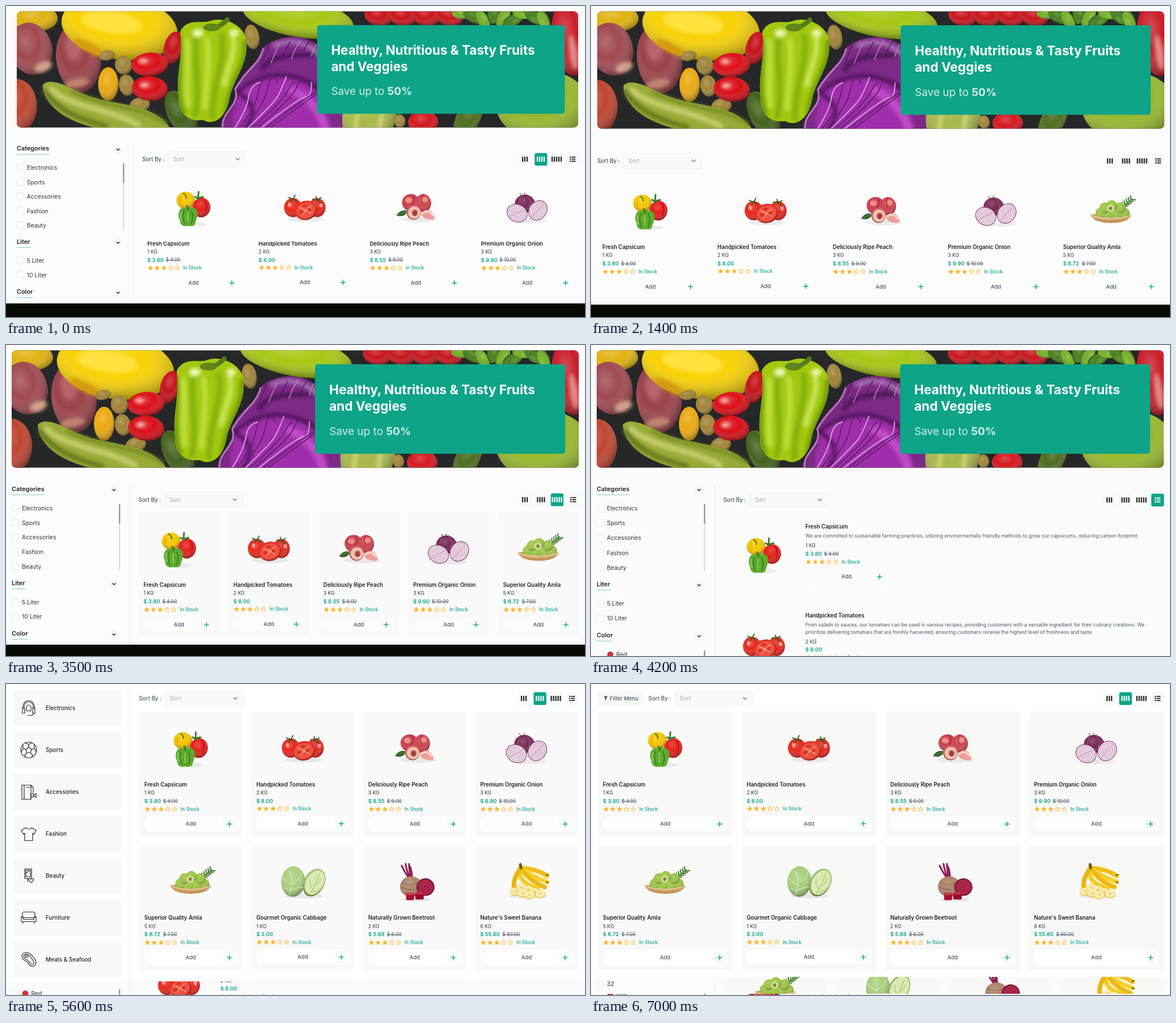
These frames come from a looping animation (1021x549 px, 7700 ms). An HTML page:

```html
<!DOCTYPE html>
<html lang="en">
<head>
<meta charset="utf-8">
<title>Shop layouts</title>
<style>
html, body { margin: 0; width: 100%; height: 100%; overflow: hidden; background: #fcfcfc; }
#stage { display: block; width: 1021px; height: 549px; font-family: Inter, "Open Sans", sans-serif; }
</style>
</head>
<body>
<svg id="stage" viewBox="0 0 1021 549" xmlns="http://www.w3.org/2000/svg"></svg>
<script>
const W = 1021, H = 549, STEP = 700;
const GREEN = '#0da487', INK = '#222', SOFT = '#4a5568';

const range = n => [...Array(n).keys()];
const text = (x, y, s, size, fill = INK, weight = 400, extra = '') =>
  `<text x="${x}" y="${y + size * 0.36}" font-size="${size}" font-weight="${weight}" fill="${fill}" ${extra}>${s.replace(/&/g, '&amp;')}</text>`;
const rect = (x, y, w, h, fill, rx = 0, extra = '') =>
  `<rect x="${x}" y="${y}" width="${w}" height="${h}" rx="${rx}" fill="${fill}" ${extra}/>`;
const oval = (x, y, rx, ry, fill, rot = 0) =>
  `<ellipse cx="${x}" cy="${y}" rx="${rx}" ry="${ry}" fill="${fill}" transform="rotate(${rot} ${x} ${y})"/>`;
const ball = (x, y, rx, ry, fill, rot = 0) => oval(x, y, rx, ry, fill, rot) + oval(x, y, rx, ry, 'url(#shade)', rot);
const shape = (d, fill) => `<path d="${d}" fill="${fill}"/>`;
const line = (d, stroke, w = 1) =>
  `<path d="${d}" fill="none" stroke="${stroke}" stroke-width="${w}" stroke-linecap="round" stroke-linejoin="round"/>`;
const soft = body => `<g filter="url(#blur)">${body}</g>`;
const move = (x, y, body, s = 1) => `<g transform="translate(${x} ${y}) scale(${s})">${body}</g>`;
const chevron = (x, y, c = INK, r = 2.4) => line(`M${x - r} ${y - r / 2}l${r} ${r}l${r} ${-r}`, c, 1.4);

// Cut onion: rings from the skin inwards
const onionHalf = (x, y, rx, ry, rot) => oval(x, y, rx, ry, '#8d4574', rot) + oval(x, y, rx - 1.3, ry - 1.3, '#f0e2ec', rot) +
  range(4).map(i => `<ellipse cx="${x}" cy="${y}" rx="${rx - 4 - i * 3.3}" ry="${ry - 4 - i * 3.3}" fill="none" stroke="#c594b7" stroke-width="1" transform="rotate(${rot} ${x} ${y})"/>`).join('');

// Produce, drawn around its own centre
const art = [
  oval(2, 29, 20, 4, '#0001') +
    ball(-14, -14, 16.5, 15, '#f7c600') + line('M-18 -26q5 2 5 8', '#5b8b2b', 2.5) + line('M-22 -20q-5 8 1 16', '#d89c05', 1.2) +
    ball(14, -1, 16, 17.5, '#e5201c', 12) + line('M20 -14q7 10 1 22', '#b10f14', 1.5) +
    line('M8 -16l1 -13M8 -17l-5 -3M9 -18l8 -2', '#3c7a2b', 3) +
    shape('M-25 5C-23 -3 -14 1 -10 -1C-4 -3 5 -1 7 6C8 16 4 23 2 30C-4 34 -9 31 -12 32C-19 34 -25 28 -24 22C-28 15 -27 9 -25 5Z', '#5cab2e') +
    line('M-17 5q-4 10 1 23M-4 5q5 10 0 23', '#367b1e', 1.6) + line('M-22 8q-2 8 1 14M-10 8q-1 8 0 16', '#94d05c', 2) +
    line('M-10 3q1 -4 -2 -7', '#3b7d22', 3),
  oval(2, 20, 32, 5, '#0001') +
    ball(-21, -1, 16, 17, '#e8281d') + ball(22, -1, 15, 17, '#e8281d') + oval(-27, -6, 3, 4, '#ff9b8d') + oval(29, -5, 3, 4, '#ff9b8d') +
    ball(2, 4, 20, 17, '#e02a20', -15) + oval(2, 4, 17, 14, '#ee5240', -15) +
    line('M2 4l-11 -5M2 4l-7 8M2 4l9 -8M2 4l9 5', '#f9a48b', 1.5) +
    oval(-6, 7, 4, 3, '#d5321f') + oval(8, 3, 3, 3, '#d5321f') + oval(0, -4, 4, 2, '#d5321f') +
    line('M-21 -16l-8 -3M-21 -16l-4 5M-21 -16l7 4M-21 -16l4 -7M22 -14l-8 -2M22 -14l7 5M22 -14l7 -5M22 -14l-2 -7', '#2f642a', 1.8),
  oval(6, 20, 32, 5, '#0001') +
    ball(-9, -10, 16, 15, '#c93d4e') + ball(13, -9, 14, 16, '#cd4450') + oval(-13, -14, 6, 5, '#e88f83') + oval(16, -15, 5, 5, '#e88f83') +
    line('M-5 -24q4 9 -2 18M12 -24q-4 8 0 16', '#a02638', 1.3) +
    shape('M-35 13Q-27 1 -15 5Q-20 18 -35 13Z', '#33622b') + line('M-33 12L-17 6', '#74a557', 0.8) +
    ball(-4, 7, 13, 13.5, '#d0535c') + oval(-3, 8, 11, 11, '#f5c3ae') + oval(-2, 8, 6, 6, '#d8807a') + oval(-2, 9, 4, 5, '#984045') +
    shape('M10 8Q24 -4 32 13Q37 23 22 20Q9 18 10 8Z', '#ee9e99') + line('M12 9Q22 2 30 13', '#fad8c7', 3),
  oval(2, 23, 32, 4, '#0001') +
    line('M-8 -20l-5 -6M-7 -20l3 -7M-6 -20l6 -4', '#9d6a54', 1.6) + ball(-4, -8, 18, 16, '#762852') +
    line('M-12 -19q-7 10 -1 19M0 -22q8 9 4 20', '#ad6692', 1) +
    onionHalf(-18, 9, 19, 16, 25) + onionHalf(19, 4, 16, 19, 38) +
    line('M-31 15L-7 3M8 16L29 -7', '#b77ca0', 0.8),
  line('M8 -1Q24 -10 37 -22', '#427a31', 1.5) +
    range(6).map(i => line(`M${17 + i * 3.6} ${-6 - i * 2.8}l-1 -7M${17 + i * 3.6} ${-6 - i * 2.8}l8 0`, '#4b8238', 2.2)).join('') +
    shape('M-37 6Q0 1 36 6Q31 20 0 21Q-30 20 -37 6Z', '#c99a5f') +
    [[-18, 3], [-5, 6], [10, 6], [23, 3], [-11, -6], [16, -6], [1, -10]].map(([x, y]) => ball(x, y, 9.5, 9.5, '#9cc445')).join('') +
    oval(-1, -5, 7, 6.5, '#c9dd88') + oval(-1, -5, 2.5, 3, '#8b7441') +
    shape('M-37 6Q0 18 36 6Q31 20 0 21Q-30 20 -37 6Z', '#cfa267') +
    line('M-36 7Q0 19 35 7', '#e8cc98', 2) + line('M-29 15Q0 22 28 15', '#a97840', 1),
  oval(2, 25, 34, 4, '#0001') + ball(-17, -1, 21, 27, '#a8cf7c', 4) +
    line('M-24 23Q-15 0 -24 -20M-19 5Q-31 0 -35 -8M-19 4Q-6 -4 -3 -15M-21 14Q-8 9 1 9M-21 15L-33 11', '#d9ebbd', 1.1) +
    ball(20, 1, 18, 26, '#93c063', 28) + oval(21, 1, 15.5, 23, '#dce9b2', 28) +
    line('M12 22Q24 4 29 -14M18 13Q11 5 13 -5M20 7Q29 3 32 -6M16 18Q28 17 33 10', '#aecb7b', 1.4),
  oval(4, 31, 26, 4, '#0001') +
    line('M-8 -4Q-18 -18 -23 -29M-7 -4Q-14 -18 -16 -32M-6 -4Q-10 -20 -10 -32M-5 -4Q-4 -16 -8 -27', '#8d1c52', 3) +
    ball(-6, 8, 20, 18, '#ac8469') + line('M-22 1q14 6 33 0M-24 9q16 8 34 3', '#7f5548', 0.8) +
    oval(19, 9, 16, 15.5, '#6d1d32') + oval(19, 9, 14.5, 14, '#a31c42') +
    range(3).map(i => `<circle cx="19" cy="9" r="${11 - i * 3.6}" fill="none" stroke="#c7446a" stroke-width="0.9"/>`).join('') +
    move(-15, 19, rect(0, 0, 14, 13, '#a90f31', 2) + rect(1, 0, 12, 4, '#d93a58', 1)) +
    move(1, 18, rect(0, 0, 15, 13, '#9c0b2c', 2) + rect(1, 0, 13, 4, '#cf2f50', 1)),
  oval(4, 25, 34, 4, '#0001') +
    [['M-10 -25Q18 -23 36 -11', '#f2c21a'], ['M-10 -25Q8 -10 36 0', '#f8d432'], ['M-10 -25Q4 -2 32 9', '#eebb15'], ['M-12 -24Q-16 2 20 11', '#f6cf2b'], ['M-12 -22Q-25 -5 -22 12', '#e9b813']]
      .map(([d, c]) => line(d, c, 8) + line(d, '#c7931655', 1)).join('') +
    line('M-10 -25l-1 -6', '#6b5a22', 5) + line('M35 -12l3 -1M35 0l3 1', '#5a4a1c', 2) +
    [[-20, 17], [-9, 10], [3, 14], [14, 18], [-7, 20], [5, 23], [24, 21]]
      .map(([x, y]) => oval(x, y, 9.5, 7.5, '#e6c54d') + oval(x, y - 0.7, 8.5, 6.6, '#faedb0') + oval(x, y - 0.7, 2.5, 2, '#e6cf7a')).join('')
];

const goods = [
  ['Fresh Capsicum', 1, '3.80', '4.00'],
  ['Handpicked Tomatoes', 2, '8.00'],
  ['Deliciously Ripe Peach', 3, '8.55', '9.00'],
  ['Premium Organic Onion', 3, '9.90', '10.00'],
  ['Superior Quality Amla', 5, '6.72', '7.00'],
  ['Gourmet Organic Cabbage', 1, '3.00'],
  ['Naturally Grown Beetroot', 2, '5.88', '6.00'],
  ["Nature's Sweet Banana", 6, '55.80', '60.00']
];

const starPath = 'M' + range(10).map(i => {
  const r = i % 2 ? 2.2 : 5.2, a = i * Math.PI / 5;
  return `${(r * Math.sin(a)).toFixed(2)} ${(-r * Math.cos(a)).toFixed(2)}`;
}).join('L') + 'Z';

function rating(x, y) {
  return range(5).map(i => move(x + 5.5 + i * 12, y, i < 3 ? shape(starPath, '#ffb321')
    : line(starPath, '#ffb321', 0.9), i < 3 ? 1 : 0.9)).join('') + text(x + 64, y - 0.3, 'In Stock', 8.5, GREEN, 500);
}

function addButton(x, y, w, fill, spot) {
  const px = x + w - 14;
  return rect(x, y - 13.3, w, 26.6, fill, 13.3) + oval(px, y, 11.8, 11.8, spot) +
    text(x + w / 2, y, 'Add', 9.5, SOFT, 500, 'text-anchor="middle"') +
    line(`M${px - 4} ${y + 0.3}h8M${px} ${y - 3.7}v8`, GREEN, 1.4);
}

function details(item, x, y, w, skin) {
  const [, kg, price, old] = item, lift = old ? 0 : 0.8;
  return text(x, y, kg + ' KG', 8.7, '#333') + text(x, y + 14.5, '$ ' + price, 9.4, GREEN, 600) +
    (old ? text(x + (price.length > 4 ? 39 : 33), y + 14.5, '$ ' + old, 8.5, SOFT, 400, 'text-decoration="line-through"') : '') +
    rating(x, y + 29 - lift) + addButton(x, y + 55 - lift, w, skin.pill, skin.card);
}

function card(i, x, y, w, skin) {
  return rect(x, y, w, goods[i][3] ? 219.5 : 218.7, skin.card, 3) +
    `<use href="#item${i}" x="${x + w / 2}" y="${y + 65}"/>` +
    text(x + 9, y + 128.3, goods[i][0], 9.65, INK, 600) + details(goods[i], x + 9, y + 143, w - 18, skin);
}

function grid(x, right, cols, y, rows, skin) {
  const gap = 15.5, w = (right - x - gap * (cols - 1)) / cols;
  return range(cols * rows).map(i =>
    card(i % 8, x + i % cols * (w + gap), y + Math.floor(i / cols) * 235.6, w, skin)).join('');
}

function sortBar(x, y, active, right) {
  const bars = n => range(n).map(i => (i - (n - 1) / 2) * 4);
  const icons = [3, 4, 5, 0].map((n, i) => {
    const on = i === active, c = on ? '#fff' : INK;
    const mark = n ? bars(n).map(dx => rect(dx - 1.1, -4.5, 2.2, 9, c)).join('')
      : range(3).map(k => rect(-5, k * 3.6 - 4.6, 2.2, 2.2, c) + rect(-1.6, k * 3.6 - 4.5, 6.8, 1.8, c)).join('');
    return move(right - [96, 67.6, 39.4, 11][i], y, rect(-11, -11, 22.5, 22.5, on ? GREEN : '#f8f8f7', 3) + mark);
  }).join('');
  return text(x, y, 'Sort By :', 9.8, SOFT, 500) +
    rect(x + 46, y - 13.5, 138, 27, '#f9f9f9', 4, 'stroke="#f0f0ee"') +
    text(x + 55, y, 'Sort', 9.9, '#a5a9ae') + chevron(x + 170, y, '#777', 3) + icons;
}

function heading(x, y, s, w) {
  return text(x, y, s, 10.95, INK, 600) + rect(x, y + 10, w, 1, '#7fcfbe') +
    oval(x + 180.5, y + 2, 7.5, 7.5, '#f7f7f5') + chevron(x + 180.5, y + 2);
}
const option = (x, y, s, dot) => rect(x + 0.5, y - 6, 12, 12, '#fff', 1, 'stroke="#e6e6e2"') +
  (dot ? oval(x + 24, y, 5.4, 5.4, dot) : '') + text(x + (dot ? 34.5 : 18), y, s, 10.4, '#333');
const scroller = (x, y, thumb, track) => rect(x, y, 2.4, track, '#dededc', 1) + rect(x, y, 2.4, thumb, '#999', 1);

function sidebar(x, y, k = 1) {
  const list = (items, top) => items.map((s, i) => option(x, y + (top + i * 26.1) * k, ...[].concat(s))).join('');
  return heading(x, y, 'Categories', 58) + list(['Electronics', 'Sports', 'Accessories', 'Fashion', 'Beauty'], 34.5) +
    scroller(x + 189, y + 26.5, 35, 119 * k) +
    heading(x, y + 168 * k, 'Liter', 25) + list(['5 Liter', '10 Liter'], 202.3) +
    heading(x, y + 258.2 * k, 'Color', 28) +
    list([['Red', '#d0323a'], ['Black', '#0b0b0b'], ['Purple', '#9b8094'], ['White', '#d6d6d6'], ['Green', GREEN]], 292.3) +
    scroller(x + 189, y + 285 * k, 72, 119) +
    heading(x, y + 426, 'Waist', 30) + list(['28', '30', '32'], 460.5);
}
const divider = (x, y) => rect(x, y, 1, H - y, '#e8e8e6');

const pepper = 'M302 46C314 20 340 32 354 27C378 17 417 33 420 62C424 104 397 130 390 164C385 196 364 215 342 203C316 207 297 190 299 160C294 122 308 91 302 46Z';
const cabbage = 'M374 220C372 188 408 176 398 148C420 106 440 106 448 75C472 55 512 45 548 70L610 130V220Z';

const produce =
  rect(0, 0, W, 230, '#262729') + ball(42, 22, 42, 24, '#e0b210') +
  ball(36, 76, 38, 47, '#a04850', -15) + ball(121, 92, 40, 62, '#9c424a', -5) +
  soft(oval(58, 108, 16, 9, '#d0a08a', -20) + oval(118, 137, 22, 8, '#c08470', -10) + oval(112, 70, 12, 26, '#b9646a')) +
  ball(10, 178, 37, 48, '#bf4530') +
  ball(194, 38, 104, 57, '#f8d204', 8) + soft(oval(180, 30, 55, 18, '#ffe23c', 8) + oval(140, 74, 30, 8, '#d79a08', 28)) +
  [[172, 88, 14, 9], [201, 105, 15, 17], [207, 141, 14, 19], [230, 176, 18, 13], [430, 55, 13, 22], [693, 205, 10, 12]]
    .map(a => ball(...a, '#a08438', -10)).join('') +
  ball(174, 139, 18, 30, '#eaa911') + ball(290, 74, 17, 29, '#c5141b', 15) +
  ball(248, 104, 33, 21, '#dc0f17', -5) + ball(248, 147, 32, 22, '#d80e16', 5) +
  soft(oval(236, 98, 8, 4, '#ffc9c0') + oval(238, 141, 8, 4, '#ffc9c0')) +
  ball(304, 192, 24, 45, '#44611d', -28) +
  shape('M57 141C68 127 96 140 121 153C184 183 250 166 286 220H165C96 207 60 177 57 141Z', '#98ab37') +
  soft(line('M72 148C105 180 175 183 228 212', '#c6cd6e', 10) + line('M62 152C84 188 130 204 170 214', '#66781f', 9) +
    line('M110 152C170 182 230 176 276 208', '#748822', 6)) +
  shape(pepper, '#a3c80f') +
  `<g clip-path="url(#pepper)">` +
    soft(line('M300 60C304 100 290 140 306 190', '#6f9c08', 12) + line('M420 66C424 108 394 130 386 190', '#6f9c08', 14) +
      line('M330 60C326 110 340 150 328 196M376 52C384 100 356 150 360 200', '#85ae0a', 9) +
      line('M314 62C318 100 312 140 316 176M350 60C356 110 346 150 346 180', '#bfdf3c', 10) +
      line('M396 56C402 86 386 110 380 140', '#cbe65c', 9) + oval(334, 48, 10, 7, '#f0f8b8') + oval(398, 48, 9, 7, '#e9f5a4')) + '</g>' +
  line('M358 38Q374 38 386 24', '#56791c', 8) + oval(358, 38, 15, 7, '#5f851b') +
  ball(512, 20, 100, 35, '#a6c812', 10) +
  shape(cabbage, '#7c2a86') +
  `<g clip-path="url(#cabbage)">` +
    soft(shape('M398 150C440 118 478 117 510 130C545 146 566 178 570 220H398C390 190 412 170 398 150Z', '#a02fac') +
      line('M400 156C440 122 490 110 548 146M448 112C470 78 520 92 556 84M420 216C440 190 430 170 410 158', '#4a1556', 8) +
      line('M470 70C500 58 530 64 556 92', '#a672b0', 8) + line('M500 150C530 160 552 190 560 216', '#c04cc8', 14)) +
    range(9).map(i => line(`M${400 + i * 8} 216Q${420 + i * 16} ${186 - i * 4} ${424 + i * 17} ${162 - i % 3 * 8}T${446 + i * 15} ${136 - i % 2 * 10}`, i % 3 ? '#65206f' : '#d79bdc', 2)).join('') +
    range(6).map(i => line(`M${446 + i * 18} ${104 - i * 3}q${8 - i} -18 ${14 + i} -34`, i % 2 ? '#b77fbd' : '#521a5e', 1.6)).join('') + '</g>' +
  line('M378 216C374 188 410 178 400 148C422 110 442 106 450 76', '#b886bd', 2.5) +
  ball(640, 185, 48, 82, '#a9b84a', 10) + soft(line('M615 217Q620 150 640 110M658 217Q665 160 660 110', '#d0d57c', 7)) +
  ball(735, 207, 27, 20, '#d51820') + ball(815, 200, 21, 46, '#4f6d20', 25) +
  range(4).map(i => ball(655 + i * 42, 18, 25, 17, '#c8161c', 12)).join('') +
  range(9).map(i => ball(805 + i * 18, 13 + i % 3 * 6, 19, 10, i % 2 ? '#457f1c' : '#74b027', i * 31)).join('') +
  ball(996, 58, 32, 66, '#c91c29', -8) + soft(oval(1002, 82, 7, 32, '#e08a86', -8)) + ball(948, 177, 83, 62, '#97b72c');

const banner = (x, y, s) => move(x, y, `<use href="#produce"/>` + rect(535, 24.5, 441, 158, GREEN, 5) +
  text(560, 69.5, 'Healthy, Nutritious & Tasty Fruits', 22.6, '#fff', 700) + text(560, 98, 'and Veggies', 22.6, '#fff', 700) +
  `<text x="560" y="149" font-size="19" fill="#d3eee8">Save up to <tspan font-weight="700">50%</tspan></text>`, s);

// Category icons, about 28 px across
const glyphs = [
  'M-10 1V-3A10 10 0 0 1 10 -3V1M-8 0V-3A8 8 0 0 1 8 -3V0M-11 0h4v9h-4zM7 0h4v9h-4zM9 9Q9 13 2 13h-4M-4 -3Q0 -8 4 -3V5H-4Z',
  'M-14 0A14 14 0 1 1 14 0A14 14 0 1 1 -14 0M0 -5L5 -1L3 5H-3L-5 -1ZM0 -5V-10L-6 -13M0 -10L6 -13M5 -1L10 -3L13 3M-5 -1L-10 -3L-13 3M3 5L7 9L5 13M-3 5L-7 9L-5 13M10 -3L10 -9M-10 -3L-10 -9',
  'M-12 -12H4V13H-12ZM-8 -12V13M-4 -8H4M4 -12L8 -8V2M3 6a3 3 0 1 0 6 0a3 3 0 1 0 -6 0M8 6l5 -3v7l-5 -3M5 9l-2 4',
  'M-5 -11Q0 -5 5 -11L13 -6L9 1L7 -1V12H-7V-1L-9 1L-13 -6Z',
  'M-7 -12H5V5H-7ZM-5 -10H3V2H-5ZM-2 5V10M4 12C-3 7 0 3 4 6C8 3 12 7 4 12M-4 -5L1 -9',
  'M-11 0V-8Q-11 -10 -8 -10H8Q11 -10 11 -8V0M-13 -2Q-9 -3 -9 3H9Q9 -3 13 -2V7H-13ZM-9 3V0H9V3M-10 7V10M10 7V10',
  'M-12 -6C-12 -14 0 -14 5 -8C10 -2 15 2 12 9C8 15 1 11 -1 6C-4 1 -12 2 -12 -6M-9 -6C-8 -11 0 -10 3 -5C6 0 11 3 9 7C6 11 2 6 0 3C-3 -1 -9 -1 -9 -6M-6 -6a2.5 2 0 1 0 5 0a2.5 2 0 1 0 -5 0'
];
const kinds = ['Electronics', 'Sports', 'Accessories', 'Fashion', 'Beauty', 'Furniture', 'Meats & Seafood'];
const categoryRow = () => kinds.map((s, i) => move(12 + i * 144.3, 10.5, rect(0, 0, 131, 90.5, '#f9f9f9', 4) +
  move(65.5, 35.5, line(glyphs[i], '#2b2b2b', 1.2)) + text(65.5, 63, s, 9.9, INK, 500, 'text-anchor="middle"'))).join('');
const categoryColumn = () => kinds.map((s, i) => move(12, 11 + i * 74, rect(0, 0, 192, 63, '#f9f9f9', 4) +
  move(28, 31.5, line(glyphs[i], '#2b2b2b', 1.2)) + text(58, 31.5, s, 9.9, INK, 500))).join('');

const pale = { card: '#fcfcfc', pill: '#fcfcfc' };
const faint = { card: '#f9f9f9', pill: '#fcfcfc' };
const solid = { card: '#f8f8f7', pill: '#fff' };

function leftPage(cols, skin) {
  return banner(10, 9.5, 1) + sidebar(10, 254, 0.988) + divider(217.5, 248) +
    sortBar(233.5, 273, cols - 3, 1011) + grid(233.5, 1010.5, cols, 295.3, 1, skin);
}
function rightPage() {
  return banner(10, 9.5, 1) + sidebar(817, 254, 0.988) + divider(802, 248) +
    sortBar(10, 273, 1, 787) + grid(10, 787, 4, 295.3, 1, pale);
}
function listPage() {
  const about = [
    ['We are committed to sustainable farming practices, utilizing environmentally friendly methods to grow our capsicums, reducing carbon footprint.'],
    ['From salads to sauces, our tomatoes can be used in various recipes, providing customers with a versatile ingredient for their culinary creations. We',
      'prioritize delivering tomatoes that are freshly harvested, ensuring customers receive the highest level of freshness and taste.']
  ];
  const rows = about.map((lines, i) => {
    const y = 321 + i * 156.4, extra = (lines.length - 1) * 13.2;
    return `<use href="#item${i}" x="305" y="${y + 49 + extra / 2}"/>` + text(378, y, goods[i][0], 9.65, INK, 600) +
      lines.map((s, k) => text(378, y + 16 + k * 13.2, s, 8.62, SOFT)).join('') +
      details(goods[i], 378, y + 33 + extra, 145, { card: '#fbfbfb', pill: '#fbfbfb' });
  }).join('');
  return banner(10, 9.5, 1) + sidebar(10, 254) + divider(217.5, 248) + sortBar(233.5, 273.5, 3, 1010) + rows;
}
const funnel = shape('M22.5 21.5H29.5L27 25V29L25 28V25Z', SOFT);
const shrink = body => move(9.1, 0.1, body, 0.99);

// Each entry: content, height it covers, background, dark footer
const scenes = [
  [shrink(leftPage(4, pale)), 525, '#fcfcfc', true],
  [shrink(rightPage()), 525.5, '#fcfcfc', true],
  [banner(11, 9.5, 1) + sortBar(11, 273.5, -1, 1011) + grid(11, 1011, 5, 297.2, 1, pale), 527.5, '#fcfcfc', true],
  [leftPage(3, faint), 529, '#fcfcfc', true],
  [leftPage(4, faint), 529, '#fcfcfc', true],
  [leftPage(5, faint), 529, '#fcfcfc', true],
  [listPage(), H, '#fbfbfb'],
  [categoryRow() + sidebar(11.5, 139) + divider(218, 134) + sortBar(234.5, 158.5, 1, 1009) +
    grid(235, 1009, 4, 181.6, 2, { card: '#f9f9f9', pill: '#fff' }), 525, '#fff'],
  [categoryColumn() + divider(218, 11) + sortBar(234.5, 25.5, 1, 1009) +
    grid(235, 1009, 4, 49, 3, { card: '#f9f9f9', pill: '#fff' }), 525, '#fff'],
  [sidebar(10, 17) + divider(217.5, 11) + banner(233.5, 11.2, 0.7765) + sortBar(233.5, 212.8, 1, 1010) +
    grid(233.5, 1010.5, 4, 236.2, 2, { card: '#f9f9f7', pill: '#fcfcfa' }), 547, '#fcfcfa'],
  [rect(12, 12, 80, 27, '#f8f8f7', 4) + funnel + text(33, 25.3, 'Filter Menu', 9.4, SOFT, 500) +
    sortBar(101.3, 25.5, 1, 1010) + grid(12, 1010, 4, 49, 2, solid), 517, '#fff']
];

const stage = document.getElementById('stage');
stage.innerHTML = `<defs>
  <radialGradient id="shade" cx=".42" cy=".34" r=".7"><stop offset="0" stop-color="#fff" stop-opacity=".2"/>
  <stop offset=".45" stop-color="#fff" stop-opacity="0"/><stop offset="1" stop-color="#000" stop-opacity=".42"/></radialGradient>
  <filter id="blur" x="-20%" y="-20%" width="140%" height="140%"><feGaussianBlur stdDeviation="3"/></filter>
  <clipPath id="frame"><rect width="1000" height="207" rx="8"/></clipPath>
  <clipPath id="pepper"><path d="${pepper}"/></clipPath>
  <clipPath id="cabbage"><path d="${cabbage}"/></clipPath>
  <g id="produce" clip-path="url(#frame)">${move(-11, -9.5, produce)}</g>
  ${art.map((a, i) => `<g id="item${i}">${a}</g>`).join('')}</defs>` +
  scenes.map(([body, h, bg, footer]) => `<g class="scene">${footer ? rect(0, h, W, H - h, '#0a0a05') : ''}
    <svg width="${W}" height="${h}" overflow="hidden">${rect(0, 0, W, h, bg)}${body}</svg></g>`).join('');

// Later pages lie over earlier ones, so uncovered strips stay visible
const layers = [...stage.querySelectorAll('.scene')];
const start = performance.now();
function draw(now) {
  const k = Math.floor(Math.max(0, now - start) / STEP) % layers.length;
  layers.forEach((g, i) => { g.style.display = i <= k ? '' : 'none'; });
  requestAnimationFrame(draw);
}
draw(start);
</script>
</body>
</html>
```
